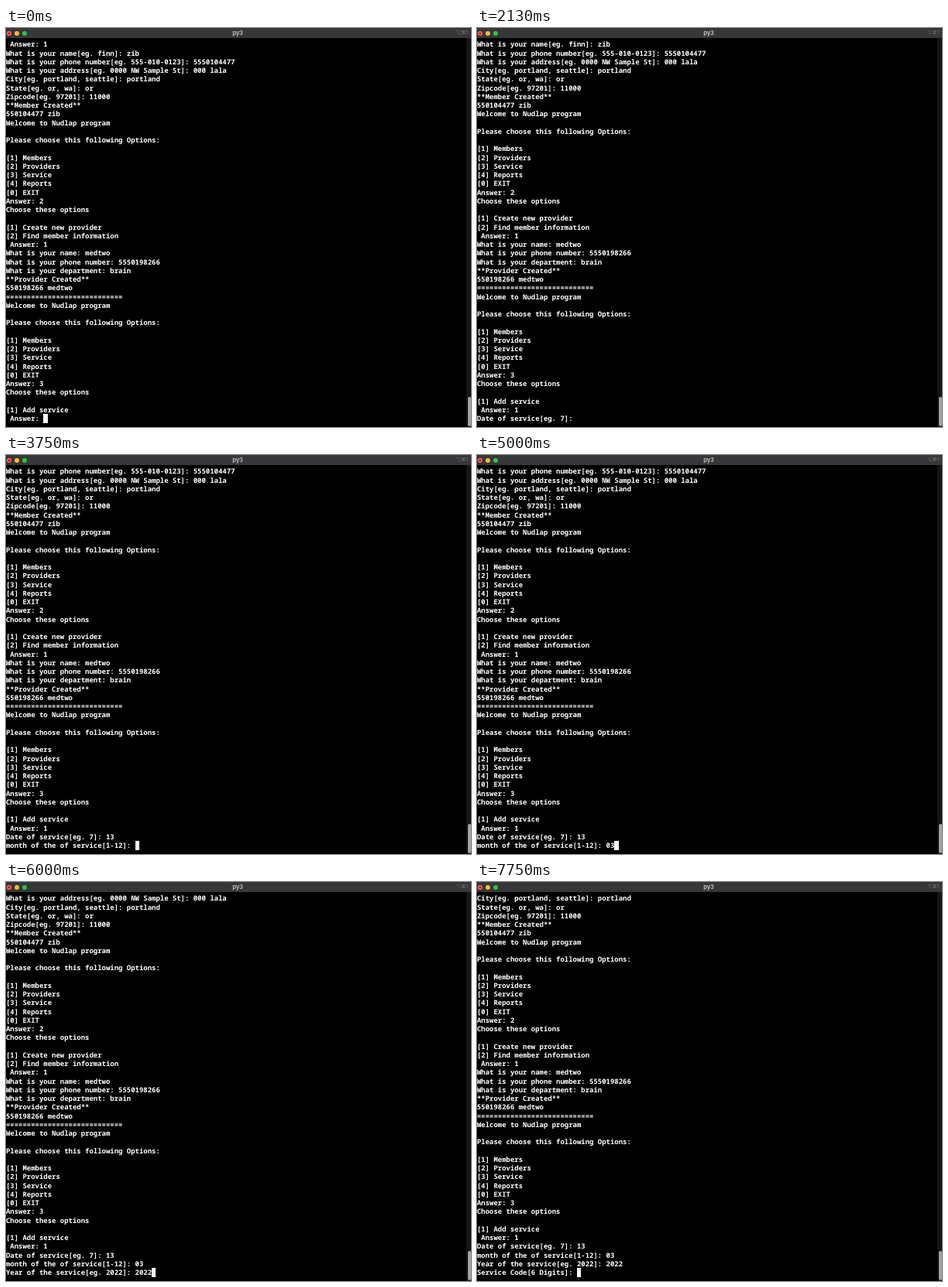
These frames come from a looping animation (600x516 px, 8 s). An HTML page:

```html
<!DOCTYPE html>
<html lang="en">
<head>
<meta charset="utf-8">
<title>Terminal session</title>
<style>
  html, body { margin: 0; width: 100%; height: 100%; overflow: hidden; background: #000; }
  #stage { position: relative; width: 600px; height: 516px; overflow: hidden; background: #000; }
  #stage > * { position: absolute; }
  #bar { left: 0; top: 0; width: 600px; height: 13px; background: #373639; }
  .light { top: 3.5px; width: 6px; height: 6px; border-radius: 50%; }
  #name, #hint { top: 0; line-height: 13px; font-family: Inter, sans-serif; }
  #name { left: 0; width: 598px; text-align: center; font-size: 7.4px; font-weight: 700; color: #bdbcbe; }
  #hint { right: 4px; font-family: Inter, "DejaVu Sans", sans-serif; font-size: 6.4px; color: #79787b; }
  #screen, #cursor {
    margin: 0; left: 0; color: #fff;
    font: 600 8.96px/11.256px "Noto Sans Mono", monospace;
    text-rendering: geometricPrecision; font-variant-ligatures: none;
  }
  #screen { top: 15.3px; white-space: pre; }
  #cursor { top: 499.3px; width: 1ch; height: 11.4px; background: #fff; }
  #track { left: 594px; top: 13px; width: 6px; height: 503px; background: #151515; }
  #thumb { left: 596px; top: 477px; width: 4px; height: 38px; border-radius: 2px; background: #a3a3a3; }
</style>
</head>
<body>
<div id="stage">
  <div id="bar"></div>
  <div class="light" style="left:1px;background:radial-gradient(#8c1a10 0 1px,#ff5f57 1.6px)"></div>
  <div class="light" style="left:11px;background:#febc2e"></div>
  <div class="light" style="left:20.5px;background:#28c840"></div>
  <div id="name">py3</div>
  <div id="hint">⌥⌘1</div>
  <div id="track"></div>
  <div id="thumb"></div>
  <pre id="screen"></pre>
  <div id="cursor"></div>
</div>
<script>
const LOOP = 8000, ROWS = 44;

const menu = choice => `Welcome to Nudlap program

Please choose this following Options:

[1] Members
[2] Providers
[3] Service
[4] Reports
[0] EXIT
Answer: ${choice}
Choose these options
`;

const history = ` Answer: 1
What is your name[eg. finn]: zib
What is your phone number[eg. 555-010-0123]: 5550104477
What is your address[eg. 0000 NW Sample St]: 000 lala
City[eg. portland, seattle]: portland
State[eg. or, wa]: or
Zipcode[eg. 97201]: 11000
**Member Created**
550104477 zib
${menu(2)}
[1] Create new provider
[2] Find member information
 Answer: 1
What is your name: medtwo
What is your phone number: 5550198266
What is your department: brain
**Provider Created**
550198266 medtwo
${"=".repeat(28)}
${menu(3)}
[1] Add service
`;

const answer = history + " Answer: ";
const date = answer + "1\nDate of service[eg. 7]: ";
const month = date + "13\nmonth of the of service[1-12]: ";
const year = month + "03\nYear of the service[eg. 2022]: ";
const code = year + "2022\nService Code[6 Digits]: ";

// [start in ms, terminal output, cursor hidden]
const steps = [
  [0, answer], [130, answer + "1"], [250, answer + "1\n"], [380, date],
  [1130, date, true], [1630, date], [2130, date, true], [2630, date], [3130, date, true],
  [3630, date + "13"], [3750, month],
  [5000, month + "03"], [5130, year],
  [5380, year + "2"], [5500, year + "20"], [5630, year + "202"], [5750, year + "2022"],
  [5880, year + "2022", true], [6000, year + "2022"], [6130, code],
  [7250, code, true], [7750, code],
];

const screenEl = document.getElementById("screen");
const cursorEl = document.getElementById("cursor");
let shown;

function draw() {
  const time = performance.now() % LOOP;
  const step = steps.findLast(([start]) => start <= time);
  if (step !== shown) {
    shown = step;
    const [, output, hidden] = step;
    const lines = output.split("\n").slice(-ROWS);
    screenEl.textContent = lines.join("\n");
    cursorEl.style.left = `${lines.at(-1).length}ch`;
    cursorEl.style.visibility = hidden ? "hidden" : "visible";
  }
  requestAnimationFrame(draw);
}
draw();
</script>
</body>
</html>
```
